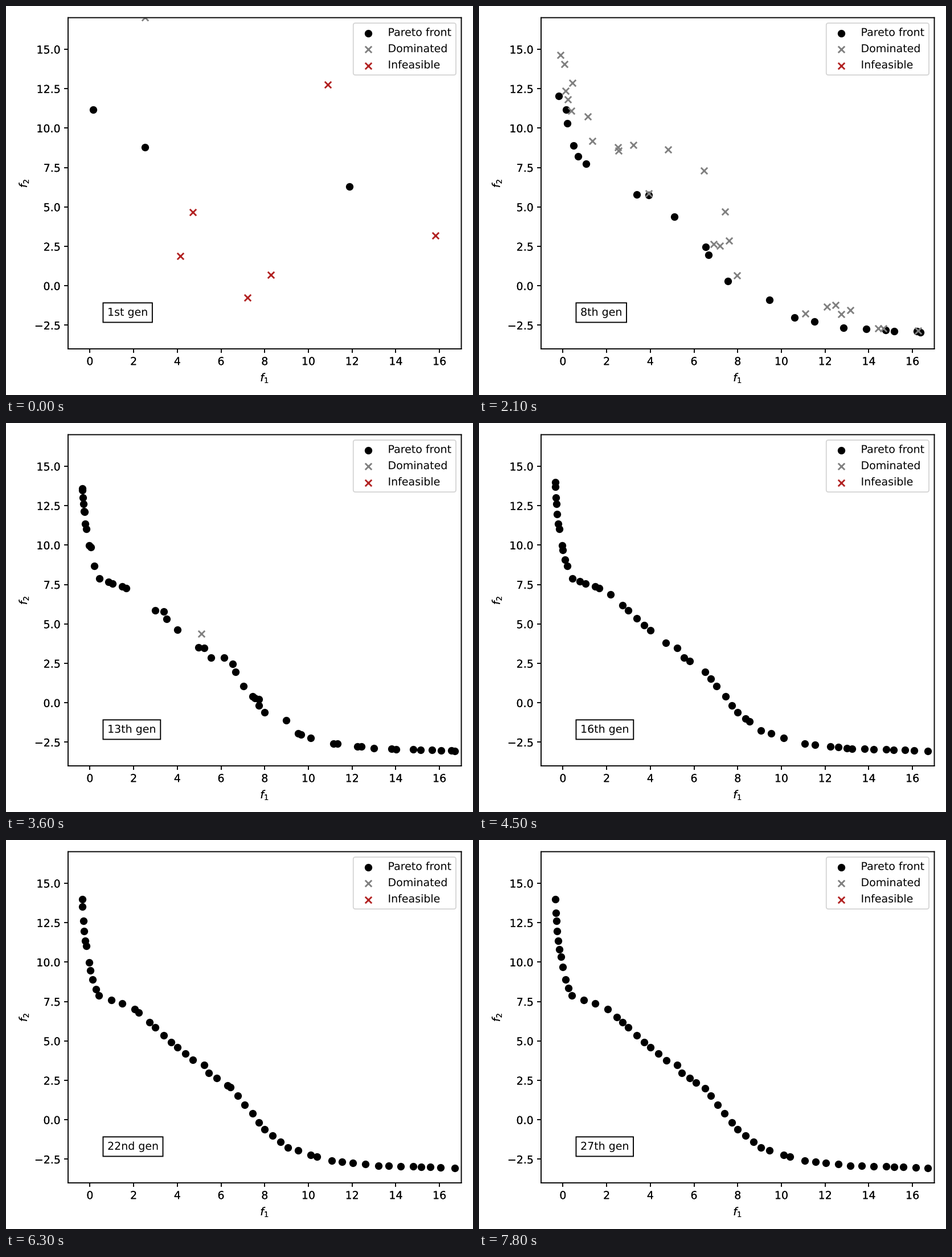
A matplotlib script for the animation above (8 s loop, 820 by 683 pixels).

```python
import numpy as np
import matplotlib.pyplot as plt
from matplotlib.animation import FuncAnimation
from matplotlib.patheffects import Normal

WIDTH, HEIGHT, DPI = 820, 683, 820 / 6
FRAME_MS, FRAMES, FRAMES_PER_GEN = 100, 80, 3
GENERATIONS = -(-FRAMES // FRAMES_PER_GEN)
POPULATION = 50
AXES_PX = dict(left=109, top=20.5, right=799.5, bottom=602)
PX_PER_UNIT = np.array([38.36, 27.69])

FIRST = [(0.15, 11.18), (2.53, 8.77), (11.88, 6.30), (2.52, 17.02)]
INFEASIBLE = [(10.89, 12.74), (4.70, 4.67), (4.14, 1.90),
              (7.20, -0.76), (15.82, 3.19), (8.29, 0.69)]

# The limit that the search closes in on.
FRONT = np.array([(-0.36, 14.05), (-0.29, 12.3), (-0.17, 10.9), (0.08, 9.1),
                  (0.36, 7.9), (2.0, 7.1), (3.65, 5.0), (5.6, 2.8),
                  (6.5, 2.0), (7.9, -0.5), (9.1, -1.8), (10.9, -2.56),
                  (13.1, -2.9), (16.75, -3.05)])


def on_front(u):
    """Points at shares u of the front's length on screen."""
    steps = np.linalg.norm(np.diff(FRONT, axis=0) * PX_PER_UNIT, axis=1)
    length = np.append(0, np.cumsum(steps))
    at = u * length[-1]
    return np.column_stack([np.interp(at, length, axis) for axis in FRONT.T])


def offspring(rng, gen):
    """Points above the front, nearer to it with each generation."""
    count = 30 if gen < 5 else 12
    share = (np.arange(count) + rng.random(count)) / count
    crowding = 0.7 if gen < 14 else 0  # early points bunch at both ends
    share -= crowding * np.sin(2 * np.pi * share) / (2 * np.pi)
    lift = 6 * np.exp(-(gen / 4.5) ** 2)
    return on_front(share) + rng.exponential(lift, (count, 2))


def times_dominated(points):
    a, b = points[:, None], points[None]
    beaten = (b <= a).all(axis=2) & (b < a).any(axis=2)
    return beaten.sum(axis=1)


def select(pool):
    losses = times_dominated(pool)
    best = pool[losses == 0]
    if len(best) <= POPULATION:
        return pool[np.argsort(losses, kind="stable")][:POPULATION]
    best = best[np.argsort(best[:, 0])]
    while len(best) > POPULATION:
        gaps = np.linalg.norm((best[2:] - best[:-2]) * PX_PER_UNIT, axis=1)
        best = np.delete(best, np.argmin(gaps) + 1, axis=0)
    return best


def evolve(seed=4):
    rng = np.random.default_rng(seed)
    history = [np.array(FIRST)]
    for gen in range(2, GENERATIONS + 1):
        history.append(select(np.vstack([history[-1], offspring(rng, gen)])))
    return history


def ordinal(n):
    suffix = {1: "st", 2: "nd", 3: "rd"}.get(n % 10, "th")
    return f"{n}th" if 10 < n % 100 < 14 else f"{n}{suffix}"


def add_axes(fig, **kwargs):
    px = AXES_PX
    box = [px["left"] / WIDTH, 1 - px["bottom"] / HEIGHT,
           (px["right"] - px["left"]) / WIDTH,
           (px["bottom"] - px["top"]) / HEIGHT]
    return fig.add_axes(box, xlim=(-1, 17), ylim=(-4, 17),
                        xlabel="$f_1$", ylabel="$f_2$",
                        xticks=np.arange(0, 17, 2),
                        yticks=np.arange(-2.5, 15.1, 2.5), **kwargs)


# Drawing everything as unsnapped paths keeps sub-pixel positions.
plt.rcParams.update({"font.family": "DejaVu Sans", "path.snap": False,
                     "path.effects": [Normal()]})
fig = plt.figure(figsize=((WIDTH + 0.001) / DPI, (HEIGHT + 0.001) / DPI),
                 dpi=DPI, facecolor="white")
ax = add_axes(fig)
add_axes(fig, facecolor="none")  # second layer: heavier axis text

front = ax.scatter([], [], color="black", label="Pareto front")
dominated = ax.scatter([], [], color="gray", marker="x", label="Dominated")
infeasible = ax.scatter([], [], color="firebrick", marker="x",
                        label="Infeasible")
ax.legend(loc="upper right")
caption = ax.text(0.1, 0.1, "", transform=ax.transAxes,
                  bbox=dict(facecolor="white"))
history = evolve()


def update(frame):
    index = frame // FRAMES_PER_GEN
    points = history[index]
    best = times_dominated(points) == 0
    front.set_offsets(points[best])
    dominated.set_offsets(points[~best])
    infeasible.set_offsets(INFEASIBLE if index == 0 else np.empty((0, 2)))
    caption.set_text(f"{ordinal(index + 1)} gen")
    return front, dominated, infeasible, caption


anim = FuncAnimation(fig, update, frames=FRAMES, interval=FRAME_MS,
                     init_func=lambda: update(0), repeat=True, repeat_delay=0)
plt.show()
```
